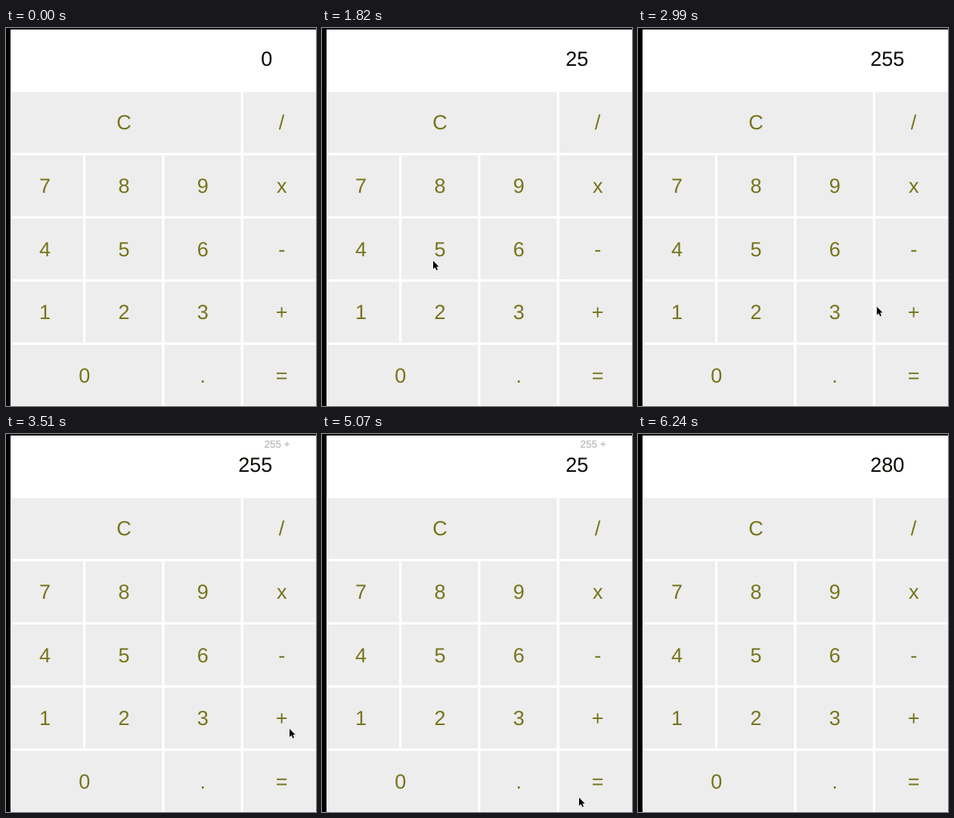
An HTML page that plays this animation: 410x500 px, repeating every 7.28 s.

```html
<!DOCTYPE html>
<html lang="en">
<head>
<meta charset="utf-8">
<title>Calculator</title>
<style>
  html, body { margin: 0; width: 100%; height: 100%; overflow: hidden; background: #000; }
  svg { display: block; width: 410px; height: 500px; }
  text { font: 27px "Liberation Sans", Arial, sans-serif; text-rendering: geometricPrecision; }
  .key { fill: #ededed; }
  .label { fill: #77741a; text-anchor: middle; }
  .value { fill: #050a02; text-anchor: end; }
  .pending { fill: #acacac; text-anchor: end; font-size: 13.5px; }
</style>
</head>
<body>
<svg viewBox="0 0 410 500">
  <rect x="6" y="2" width="404" height="498" fill="#fff"/>
  <g id="keys"></g>
  <text id="pending" class="pending" x="375.6" y="18.2"></text>
  <text id="value" class="value" x="352.3" y="50.3"></text>
  <path id="cursor" d="M0 0V10.8L2.5 8.5L4.4 12.5L6 11.8L4.3 7.8H7.6Z"
        stroke="#fff" stroke-width=".5" paint-order="stroke"/>
</svg>
<script>
const TICK = 130, LOOP = 56;            // ms per tick, ticks per loop
const COL = 104.35, ROW = 83.6, GAP = 3.2;
const $ = id => document.getElementById(id);

function add(tag, attrs, text = '') {
  const el = document.createElementNS('http://www.w3.org/2000/svg', tag);
  for (const name in attrs) el.setAttribute(name, attrs[name]);
  el.textContent = text;
  $('keys').append(el);
}

// a repeated letter is one wide key
['CCC/', '789x', '456-', '123+', '00.='].forEach((row, r) => {
  for (const label of new Set(row)) {
    const left = row.indexOf(label) * COL + 0.8, top = 84.8 + r * ROW;
    const right = (row.lastIndexOf(label) + 1) * COL + 0.8 - GAP;
    const x = Math.max(7, left);
    add('rect', { class: 'key', x, y: top, width: right - x, height: ROW - GAP });
    add('text', { class: 'label', x: (left + right) / 2 + 0.2, y: top + 49.6 }, label);
  }
});

// tick of each key press
const PRESSES = { 9: '2', 13: '5', 17: '5', 26: '+', 32: '2', 36: '5', 42: '=' };

// pointer stops: arrival tick, departure tick, x, y
const STOPS = [
  [2, 2, 397, 290], [6, 9, 147, 374], [11, 19, 147, 308], [25, 27, 375, 390],
  [31, 32, 162, 376], [34, 36, 170, 308], [39, 39, 340, 481], [41, 47, 354, 473]
];

function screenAt(tick) {
  let value = '0', pending = '', fresh = true;
  for (const at in PRESSES) {
    if (at > tick) break;
    const key = PRESSES[at];
    if (key === '+') pending = value + ' +';
    else if (key === '=') {
      value = String(parseInt(pending) + Number(value));
      pending = '';
    } else value = fresh ? key : value + key;
    fresh = key === '+' || key === '=';
  }
  return { value, pending };
}

const ease = p => p * p * (3 - 2 * p);

function pointerAt(tick) {
  const next = STOPS.findIndex(([, leave]) => leave >= tick);
  if (next < 0 || tick < STOPS[0][0]) return null;
  const [arrive, , x, y] = STOPS[next];
  if (tick >= arrive) return [x, y];
  const [, leave, x0, y0] = STOPS[next - 1];
  const p = ease((tick - leave) / (arrive - leave));
  return [x0 + (x - x0) * p, y0 + (y - y0) * p];
}

function draw(time) {
  const tick = Math.floor(time / TICK) % LOOP;
  const { value, pending } = screenAt(tick);
  $('value').textContent = value;
  $('pending').textContent = pending;
  const tip = pointerAt(tick);
  $('cursor').setAttribute('visibility', tip ? 'visible' : 'hidden');
  if (tip) $('cursor').setAttribute('transform', `translate(${tip})`);
}

const start = performance.now();
function frame() {
  draw(performance.now() - start);
  requestAnimationFrame(frame);
}
frame();
</script>
</body>
</html>
```
